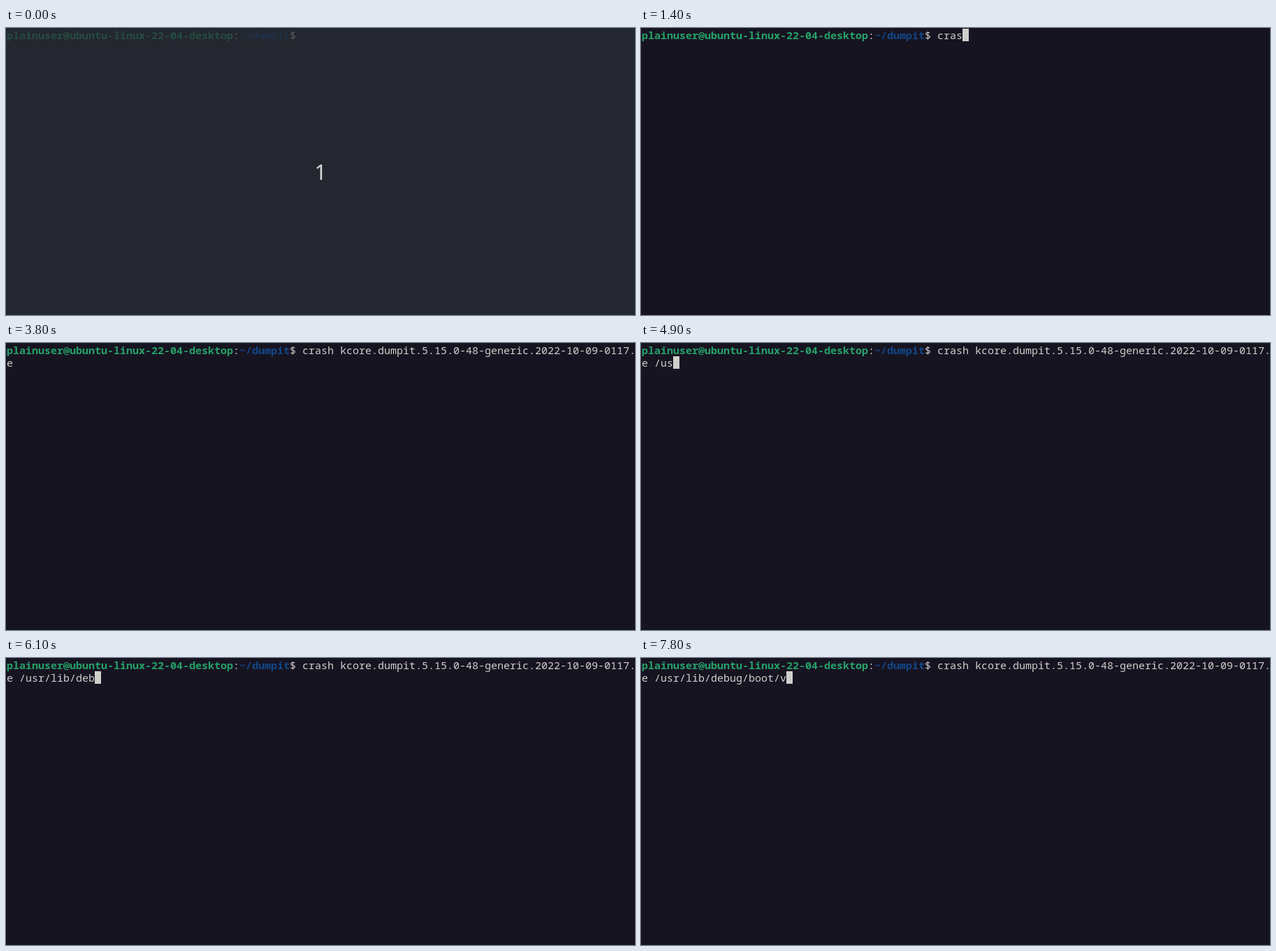
An HTML page for the animation above (8000 ms loop, 900x412 px).

```html
<!DOCTYPE html>
<html lang="en">
<head>
<meta charset="utf-8">
<title>Terminal session</title>
<style>
  html, body { margin: 0; width: 100%; height: 100%; overflow: hidden; background: #171421; }
  #stage { position: relative; width: 900px; height: 412px; overflow: hidden; background: #171421; }
  #stage.intro { background: #24272f; }
  .intro #screen { opacity: .3; }
  #screen {
    position: absolute; left: 1px; top: 1px; margin: 0; color: #d0cfcc;
    font: 15px/18px "Noto Sans Mono", "DejaVu Sans Mono", monospace;
    white-space: pre; font-variant-ligatures: none;
  }
  b { color: #26a269; }
  b.path { color: #12488b; }
  #cursor { position: absolute; width: 9px; height: 18px; background: #d0cfcc; }
  #count {
    position: absolute; left: 0; top: 186px; width: 900px; text-align: center;
    font: 30px/41px "Noto Sans", "Open Sans", sans-serif; color: #d6d7d9;
  }
</style>
</head>
<body>
<div id="stage" class="intro">
  <pre id="screen"><b>plainuser@ubuntu-linux-22-04-desktop</b>:<b class="path">~/dumpit</b>$ <span id="typed"></span></pre>
  <div id="cursor"></div>
  <div id="count">1</div>
</div>
<script>
const LOOP = 8000, INTRO_END = 100, PROMPT_COLS = 47, CELL_W = 9, CELL_H = 18;

// [time in ms, text that appears]; the long chunk is a tab completion
const keys = [
  [600, "c"], [900, "r"], [1000, "a"], [1400, "s"], [1500, "h"], [1600, " "],
  [1900, "k"], [2700, "c"], [3200, "o"],
  [3300, "re.dumpit.5.15.0-48-generic.2022-10-09-0117.cor\ne "],
  [4400, "/"], [4900, "us"], [5200, "r/"],
  [5400, "l"], [5500, "i"], [5600, "b"], [5800, "/"], [5900, "d"],
  [6100, "eb"], [6200, "u"], [6300, "g"], [6500, "/"],
  [7200, "b"], [7300, "o"], [7400, "o"], [7500, "t"], [7700, "/"], [7800, "v"]
];
// spans in which the blinking cursor is dark
const dark = [[0, 500], [2400, 2600], [3800, 4400]];

const $ = id => document.getElementById(id);
const stage = $("stage"), typed = $("typed"), cursor = $("cursor"), count = $("count");

function draw(t) {
  const intro = t < INTRO_END;
  stage.className = intro ? "intro" : "";
  count.hidden = !intro;

  const text = keys.filter(k => k[0] <= t).map(k => k[1]).join("");
  if (typed.textContent !== text) typed.textContent = text;

  const lines = text.split("\n"), row = lines.length - 1;
  const col = lines[row].length + (row ? 0 : PROMPT_COLS);
  cursor.style.left = 1 + col * CELL_W + "px";
  cursor.style.top = 1 + row * CELL_H + "px";
  cursor.hidden = dark.some(([from, to]) => t >= from && t < to);
}

const start = performance.now();
function frame() {
  draw((performance.now() - start) % LOOP);
  requestAnimationFrame(frame);
}
frame();
</script>
</body>
</html>
```
